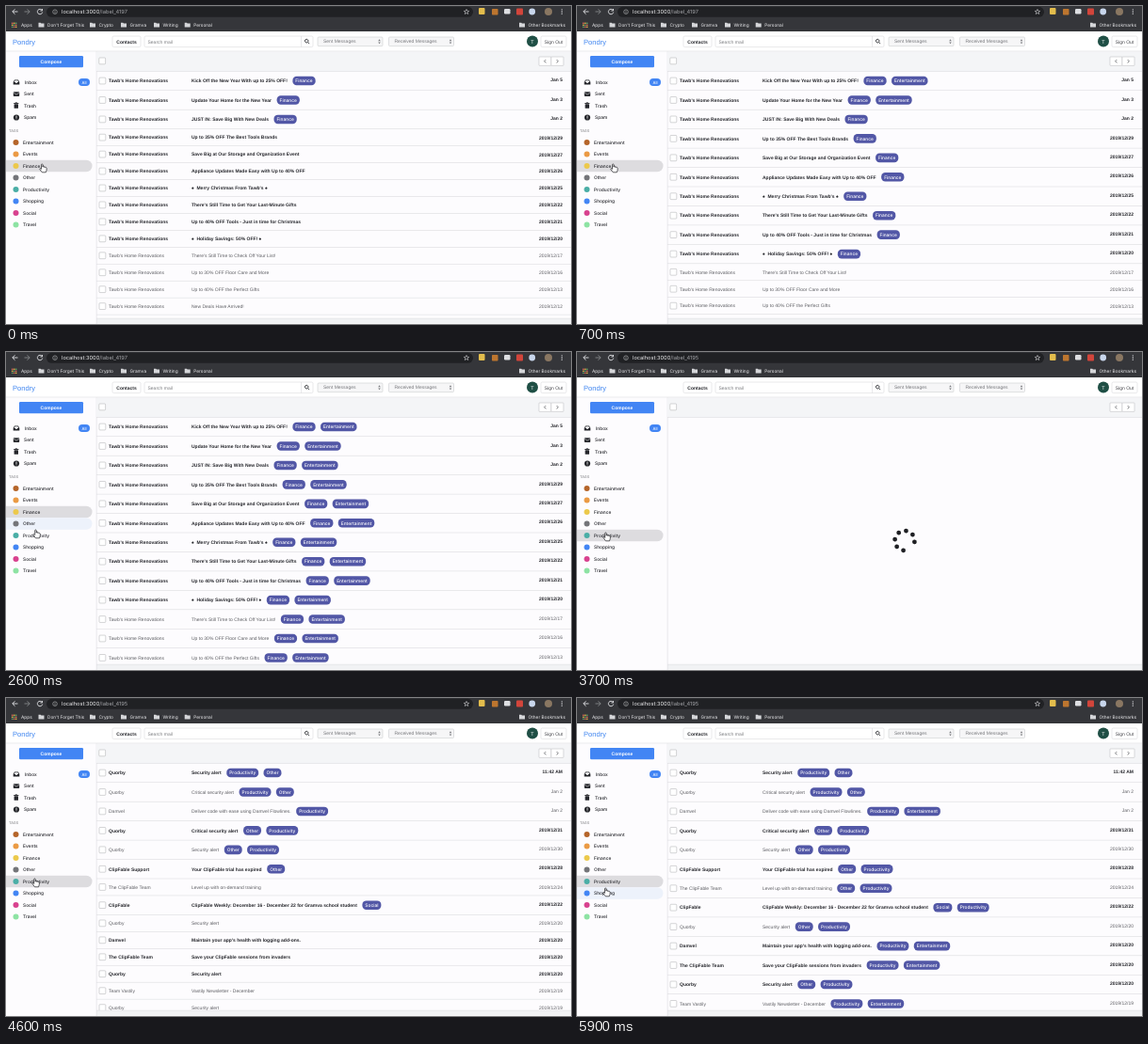
An HTML page with a canvas for the animation above (6 s loop, 600x338 px).

```html
<!DOCTYPE html>
<html lang="en">
<head>
<meta charset="utf-8">
<title>Mail tags</title>
<style>
html, body { margin: 0; width: 100%; height: 100%; overflow: hidden; background: #fff; }
canvas { display: block; width: 600px; height: 338px; }
</style>
</head>
<body>
<canvas id="stage"></canvas>
<script>
const LOOP = 6000, STEP = 100;
const SWITCH = 3100, LOADED = 4000;
const SANS = '"Liberation Sans", Arial, "DejaVu Sans", sans-serif';
const UI = 'Inter, "Open Sans", sans-serif';
const INK = '#25262b', GREY = '#5d5e63', BLUE = '#4285f4', LINE = '#dcdde0', PAPER = '#fdfcfe';

const canvas = document.getElementById('stage');
const ratio = window.devicePixelRatio || 1;
canvas.width = 600 * ratio;
canvas.height = 338 * ratio;
const c = canvas.getContext('2d');

// ---------- data ----------
const TAGS = [
  ['Entertainment', '#b5652a'], ['Events', '#eb9a44'], ['Finance', '#ecc94b'], ['Other', '#747579'],
  ['Productivity', '#4aaea6'], ['Shopping', '#4285f4'], ['Social', '#d8418f'], ['Travel', '#8de3a3']
];
const CODES = { E: 'Entertainment', F: 'Finance', O: 'Other', P: 'Productivity', S: 'Social' };
const SHOP = "Tawb's Home Renovations";

// Each mail: sender, subject, date, tags; unread mails are marked with '*'
const parse = text => text.trim().split('\n').map(line => {
  const [from, subject, date, tags] = line.replace('*', '').split('|');
  return { from: from || SHOP, subject, date, tags, unread: line[0] === '*' };
});

const finance = parse(`
*|Kick Off the New Year With up to 25% OFF!|Jan 5|FE
*|Update Your Home for the New Year|Jan 3|FE
*|JUST IN: Save Big With New Deals|Jan 2|FE
*|Up to 35% OFF The Best Tools Brands|2019/12/29|FE
*|Save Big at Our Storage and Organization Event|2019/12/27|FE
*|Appliance Updates Made Easy with Up to 40% OFF|2019/12/26|FE
*|♠  Merry Christmas From Tawb's ♠|2019/12/25|FE
*|There's Still Time to Get Your Last-Minute Gifts|2019/12/22|FE
*|Up to 40% OFF Tools - Just in time for Christmas|2019/12/21|FE
*|♠  Holiday Savings: 50% OFF! ♠|2019/12/20|FE
|There's Still Time to Check Off Your List!|2019/12/17|FE
|Up to 30% OFF Floor Care and More|2019/12/16|FE
|Up to 40% OFF the Perfect Gifts|2019/12/13|FE
|New Deals Have Arrived!|2019/12/12|FE`);

const productivity = parse(`
*Quorby|Security alert|11:42 AM|PO
Quorby|Critical security alert|Jan 2|PO
Damvel|Deliver code with ease using Damvel Flowlines.|Jan 2|PE
*Quorby|Critical security alert|2019/12/31|OP
Quorby|Security alert|2019/12/30|OP
*ClipFable Support|Your ClipFable trial has expired|2019/12/28|OP
The ClipFable Team|Level up with on-demand training|2019/12/24|OP
*ClipFable|ClipFable Weekly: December 16 - December 22 for Gramva school student|2019/12/22|SP
Quorby|Security alert|2019/12/20|OP
*Damvel|Maintain your app's health with logging add-ons.|2019/12/20|PE
*The ClipFable Team|Save your ClipFable sessions from invaders|2019/12/20|PE
*Quorby|Security alert|2019/12/20|OP
Team Vastily|Vastily Newsletter - December|2019/12/19|PE
Quorby|Security alert|2019/12/19|OP`);

// Moments at which the first and second tag of each mail arrive
finance.forEach((m, i) => { m.at = [Math.max(0, (i - 2) * 95), 550 + i * 80]; });
const secondPass = [0, 1, 3, 4, 2, 5, 6, 7, 8, 9, 10, 11, 12, 13];
productivity.forEach((m, i) => {
  const turn = secondPass.indexOf(i);
  m.at = [m.tags[0] === 'S' ? LOADED : LOADED + 10 + i * 100,
          turn < 4 ? 4200 + turn * 100 : 4640 + (turn - 4) * 150];
});

const path = [[0, 37.5, 168], [2200, 37.5, 168], [2400, 35, 174], [2600, 30.7, 189], [2750, 29.7, 192],
              [5400, 29.7, 192], [5700, 29.7, 199], [5850, 29.5, 202], [6000, 29.5, 202]];

function cursorAt(t) {
  const i = Math.max(1, path.findIndex(p => p[0] >= t));
  const [t0, x0, y0] = path[i - 1], [t1, x1, y1] = path[i];
  const k = (t - t0) / (t1 - t0);
  return [x0 + (x1 - x0) * k, y0 + (y1 - y0) * k];
}

// ---------- drawing helpers ----------
function rect(x, y, w, h, color) {
  c.fillStyle = color;
  c.fillRect(x, y, w, h);
}
function round(x, y, w, h, r, fill, stroke, width = 0.5) {
  c.beginPath();
  c.roundRect(x, y, w, h, r);
  if (fill) { c.fillStyle = fill; c.fill(); }
  if (stroke) { c.strokeStyle = stroke; c.lineWidth = width; c.stroke(); }
}
function dot(x, y, r, color) {
  c.beginPath();
  c.arc(x, y, r, 0, 7);
  c.fillStyle = color;
  c.fill();
}
function stroke(d, color, width, x = 0, y = 0) {
  c.save();
  c.translate(x, y);
  c.strokeStyle = color;
  c.lineWidth = width;
  c.stroke(new Path2D(d));
  c.restore();
}
function fill(d, color, x = 0, y = 0) {
  c.save();
  c.translate(x, y);
  c.fillStyle = color;
  c.fill(new Path2D(d));
  c.restore();
}
// Fonts are set ten times larger and scaled down, for exact small advances
function setFont(size, weight, family) {
  c.font = `${weight} ${size * 10}px ${family}`;
  c.textRendering = 'geometricPrecision';
}
function widthOf(str, size, weight, family) {
  setFont(size, weight, family);
  return c.measureText(str).width / 10;
}
function text(str, x, y, color = INK, size = 5, weight = 400, family = SANS, align = 'left') {
  c.save();
  c.translate(x, y + size * 0.36);
  c.scale(0.1, 0.1);
  setFont(size, weight, family);
  c.textAlign = align;
  c.fillStyle = color;
  c.fillText(str, 0, 0);
  c.restore();
}
function checkbox(x, y) {
  round(x, y - 3.4, 6.8, 6.8, 0.8, '#fff', '#a9aaad');
}

// ---------- page parts ----------
function folder(x, label) {
  fill('M-3-2.4h2.2l.8.8h3v4h-6z', '#d5d6d9', x, 20.2);
  text(label, x + 6.5, 20.2, '#eeeef0', 4.8, 400, UI);
}

function browserBar(t) {
  rect(0, 0, 600, 27, '#35363a');
  round(43, 0.8, 453, 11, 5.5, '#202124');
  stroke('M3 0H-2.6M0-2.7L-2.7 0L0 2.7', '#e4e5e8', 0.9, 9.5, 6);
  stroke('M-3 0H2.6M0-2.7L2.7 0L0 2.7', '#85868a', 0.9, 22.5, 6);
  stroke('M2.2-1.6A2.7 2.7 0 1 0 2.7.6M2.5-3V-1H.4', '#e4e5e8', 0.9, 36, 6);
  c.beginPath();
  c.arc(52, 6.2, 2.3, 0, 7);
  c.strokeStyle = '#b9babd';
  c.lineWidth = 0.6;
  c.stroke();
  rect(51.7, 5.8, 0.6, 1.8, '#b9babd');
  rect(51.7, 4.8, 0.6, 0.6, '#b9babd');
  text('localhost:3000', 59, 6.2, '#f1f1f3', 5.7, 400, UI);
  const host = widthOf('localhost:3000', 5.7, 400, UI);
  text('/label_' + (t < SWITCH ? 4197 : 4195), 59 + host, 6.2, '#a5a6aa', 5.7, 400, UI);
  stroke('M0-2.7L.8-.9L2.7-.8L1.2.4L1.7 2.3L0 1.2L-1.7 2.3L-1.2.4L-2.7-.8L-.8-.9Z', '#d5d6d9', 0.6, 489, 6.2);

  round(502, 2, 6.5, 7, 1, '#e3bd4c');
  round(516, 3, 6.5, 6.5, 0.8, '#bd762f');
  round(529, 3, 6.5, 5.5, 1.2, '#dedfe2');
  round(542, 2.5, 7, 7, 1, '#d2453b');
  dot(558.7, 6, 3.4, '#c8d6ec');
  dot(576, 6, 4, '#8a7762');
  for (const dy of [-2.2, 0, 2.2]) dot(590.3, 6 + dy, 0.65, '#dedfe2');

  const dotColors = ['#e8695c', '#e9b949', '#62a869'];
  for (let i = 0; i < 9; i++)
    rect(6 + (i % 3) * 2, 17.6 + Math.floor(i / 3) * 2, 1.4, 1.4, dotColors[(i + Math.floor(i / 3)) % 3]);
  text('Apps', 16, 20.2, '#eeeef0', 4.8, 400, UI);
  folder(37.5, "Don't Forget This");
  folder(92, 'Crypto');
  folder(125, 'Gramva');
  folder(160, 'Writing');
  folder(192.7, 'Personal');
  folder(548, 'Other Bookmarks');
}

function select(x, label) {
  round(x, 33, 69, 9.6, 1, '#f6f6f7', '#c3c4c7');
  text(label, x + 6, 37.6, '#77787c');
  fill('M-1.3-.6L0-2.5L1.3-.6ZM-1.3.6L0 2.5L1.3.6Z', '#77787c', x + 65.5, 37.8);
}

function header() {
  rect(0, 27, 600, 21, '#fff');
  rect(0, 47.7, 600, 0.6, LINE);
  text('Pondry', 7, 37.8, '#3f86f0', 7.6);
  round(113, 32, 30, 11.6, 1.5, '#fff', '#d2d3d6');
  text('Contacts', 128, 37.8, INK, 5, 700, SANS, 'center');
  round(147, 32, 179, 11.6, 1.5, '#fff', '#d2d3d6');
  rect(313, 32, 0.5, 11.6, '#d2d3d6');
  text('Search mail', 150.5, 37.8, '#7c7d81');
  stroke('M1.1.8A1.8 1.8 0 1 1 1.1-1.7A1.8 1.8 0 0 1 1.1.8L2.7 2.5', '#333438', 0.9, 319.4, 37.6);
  select(331, 'Sent Messages');
  select(406.5, 'Received Messages');
  dot(559, 37.6, 6, '#1f4f45');
  text('T', 559, 37.6, '#fff', 5.4, 400, SANS, 'center');
  round(568, 32, 27, 11.6, 1.5, '#fff', '#d2d3d6');
  text('Sign Out', 581.5, 37.8, '#44454a', 5, 400, SANS, 'center');
}

function sidebar(t) {
  rect(0, 48.3, 96, 290, PAPER);
  round(14, 53, 68, 12.2, 1.2, BLUE);
  text('Compose', 48, 59, '#fff', 5, 700, SANS, 'center');

  fill('M-3.3 0L-2-2.5H2L3.3 0V2.5H-3.3ZM-2.3 0H-1L-.5 1H.5L1 0H2.3L1.5-1.7H-1.5Z', INK, 11, 81);
  round(7.8, 91.2, 6.4, 4.8, 0.7, INK);
  stroke('M-3-1.5L0 .7L3-1.5', '#fff', 0.5, 11, 93.5);
  rect(8.2, 103, 5.2, 0.9, INK);
  rect(9.8, 102.4, 2, 0.8, INK);
  round(8.6, 104.3, 4.4, 4.5, 0.5, INK);
  dot(11, 118.5, 3.1, INK);
  rect(10.6, 116.6, 0.8, 2.3, '#fff');
  rect(10.6, 119.4, 0.8, 0.8, '#fff');
  ['Inbox', 'Sent', 'Trash', 'Spam'].forEach((name, i) =>
    text(name, i ? 19 : 20, 81 + i * 12.45, INK, 4.85, 500, UI));
  round(77, 77, 12, 8, 4, BLUE);
  text('All', 83, 81, '#fff', 4.2, 500, UI, 'center');
  text('TAGS', 3, 133, '#77787c', 3.9, 400, UI);

  const selected = t < SWITCH ? 2 : 4;
  const hovered = Math.floor((cursorAt(Math.max(0, t - 60))[1] - 138.7) / 12.5);
  TAGS.forEach(([name, color], i) => {
    const y = 145 + i * 12.5;
    const back = i === selected ? '#dddcdf' : i === hovered ? '#edf2fb' : null;
    if (back) round(0, y - 6.2, 91.5, 12.4, [0, 6.2, 6.2, 0], back);
    dot(10.5, y, 3, color);
    text(name, 18, y, INK, 4.85, 500, UI);
  });
}

function toolbar() {
  rect(96, 48.3, 504, 21, '#f4f5f7');
  checkbox(98.8, 58.4);
  round(566, 54, 13, 9.4, 0.5, '#fff', '#b4b5b8');
  round(579, 54, 13, 9.4, 0.5, '#fff', '#b4b5b8');
  stroke('M.8-1.7L-.8 0L.8 1.7', '#44454a', 0.7, 572.5, 58.7);
  stroke('M-.8-1.7L.8 0L-.8 1.7', '#44454a', 0.7, 585.5, 58.7);
  rect(96, 69, 504, 0.6, LINE);
}

function chip(name, x, y) {
  const w = widthOf(name, 4.85, 500, UI) + 5.9;
  round(x, y - 4.8, w, 9.6, 4.2, '#5257a6');
  text(name, x + w / 2, y, '#fff', 4.85, 500, UI, 'center');
  return w;
}

function mailList(mails, t) {
  let top = 69.3;
  for (const m of mails) {
    const tags = [...m.tags].filter((_, i) => t >= m.at[i]);
    const height = tags.length ? 20.45 : 17.95;
    const y = top + height / 2;
    const weight = m.unread ? 700 : 400, color = m.unread ? INK : GREY;
    checkbox(99, y);
    text(m.from, 109, y, color, 5, weight);
    text(m.subject, 197, y, color, 5, weight);
    text(m.date, 591, top + 9.1, color, 5, weight, SANS, 'right');
    let x = 197 + widthOf(m.subject, 5, weight, SANS) + 5.6;
    for (const tag of tags) x += chip(CODES[tag], x, y) + 5.4;
    top += height;
    rect(96, top - 0.3, 504, 0.6, LINE);
  }
}

function spinner(t) {
  c.save();
  c.translate(348, 200.5);
  c.rotate((t - 3156) * Math.PI / 1000);
  for (let i = 0; i < 7; i++) {
    const a = i * Math.PI / 4;
    dot(10.5 * Math.cos(a), 10.5 * Math.sin(a), 2.4, '#1f2024');
  }
  c.restore();
}

function content(t) {
  c.save();
  c.beginPath();
  c.rect(96, 69.3, 504, 262.7);
  c.clip();
  rect(96, 69, 504, 263, PAPER);
  if (t < SWITCH) mailList(finance, t);
  else if (t < LOADED) spinner(t);
  else mailList(productivity, t);
  c.restore();
  rect(96, 332, 504, 5.5, '#f1f2f4');
  rect(96, 331.8, 504, 0.6, LINE);
  rect(95.8, 48, 0.6, 290, LINE);
  toolbar();
}

function pointer(t) {
  const [x, y] = cursorAt(t);
  const hand = 'M0 .7C0-.3 1.5-.3 1.5.7V3.2C2-.0 3 2.6 3 3.4C3.4 2.7 4.3 3 4.3 3.7' +
    'C4.8 3.2 5.6 3.6 5.6 4.4V6.4L4.8 8.8H.8L-1.6 5.6C-2 4.9-1.1 4.3-.5 4.9L0 5.4Z';
  fill(hand, '#fff', x, y);
  stroke(hand, '#1d1e22', 0.7, x, y);
}

function draw(t) {
  c.setTransform(ratio, 0, 0, ratio, 0, 0);
  rect(0, 0, 600, 338, '#fff');
  sidebar(t);
  content(t);
  header();
  browserBar(t);
  pointer(t);
}

const start = performance.now();
function tick() {
  const t = (performance.now() - start) % LOOP;
  draw(Math.floor(t / STEP) * STEP);
  requestAnimationFrame(tick);
}
tick();
</script>
</body>
</html>
```
